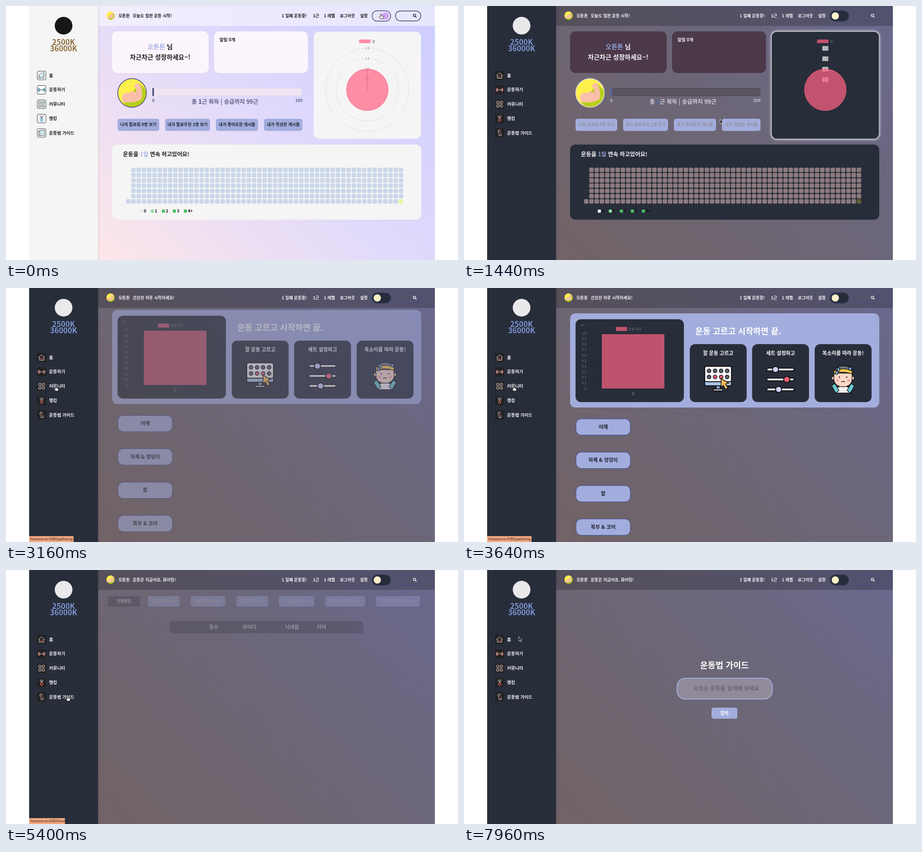
An HTML page that plays this animation: 997 by 561 pixels, repeating every 8000 ms.

```html
<!DOCTYPE html>
<html lang="ko">
<head>
<meta charset="utf-8">
<style>
html, body { margin: 0; width: 100%; height: 100%; overflow: hidden; background: #fff; }
svg { display: block; width: 997px; height: 561px; font: 700 9px "Noto Sans CJK KR", "Noto Sans CJK", "Noto Sans", sans-serif; }
:root {
  --k: 0%;
  --b: 0%;
  --ink: color-mix(in srgb, #1d1d22, #f6f4f8 var(--k));
  --panel: color-mix(in srgb, #f5f5f5, #282d3a var(--k));
  --card: color-mix(in srgb, #fcf5fc, #4c394a var(--k));
  --bg0: color-mix(in srgb, #fde6e8, #716366 var(--k));
  --bg1: color-mix(in srgb, #e1dafb, #6c6676 var(--k));
  --bg2: color-mix(in srgb, #cdcdff, #69698e var(--k));
  --bar: color-mix(in srgb, #ffffff80, #00000036 var(--k));
  --name: color-mix(in srgb, #a9b0e2, #8f9fd6 var(--k));
  --soft: color-mix(in srgb, #5d6288, #d2ced8 var(--k));
  --one: color-mix(in srgb, #3d4672, #5468aa var(--k));
  --ring: color-mix(in srgb, #4f5384, #d9d4dd var(--k));
  --track: color-mix(in srgb, #f0e4f3, #595460 var(--k));
  --trackEdge: color-mix(in srgb, #ddd6ec, #4c4853 var(--k));
  --cell: color-mix(in srgb, #cad7e9, #8d7b7f var(--k));
  --today: color-mix(in srgb, #e9f59e, #62602f var(--k));
  --pill: color-mix(in srgb, #e8e4fb, #272c3a var(--k));
  --pillEdge: color-mix(in srgb, #3b4570, #2f3960 var(--k));
  --searchEdge: color-mix(in srgb, #3b4570, #474e7a var(--k));
  --knob: color-mix(in srgb, #d0a5f3, #fbf0c9 var(--k));
  --mark: color-mix(in srgb, #17171a, #e9e9ec var(--k));
  --brand: color-mix(in srgb, #8c6d3c, #7d95d2 var(--k));
  --tile: color-mix(in srgb, #ffffff, #222222 var(--k));
  --tileEdge: color-mix(in srgb, #33363c, #222222 var(--k));
  --line: color-mix(in srgb, #30343a, #f0e6e2 var(--k));
  --accent: color-mix(in srgb, #2fa3b4, #d9605f var(--k));
  --btnInk: color-mix(in srgb, #20222e, #f4f2f8 var(--b));
  --none: color-mix(in srgb, #eeeeee, #ffffff var(--k));
}
</style>
</head>
<body>
<svg id="stage" viewBox="0 0 997 561" fill="var(--ink)"></svg>
<script>
const LILAC = '#a3addd', NAVY = '#282d3a', PINK = '#ff6384';
const USER = '오튼튼';

const rect = (x, y, w, h, r, fill, more = '') =>
  `<rect x="${x}" y="${y}" width="${w}" height="${h}" rx="${r}" fill="${fill}" ${more}/>`;
const circle = (x, y, r, fill, more = '') => `<circle cx="${x}" cy="${y}" r="${r}" fill="${fill}" ${more}/>`;
const path = (d, fill, more = '') => `<path d="${d}" fill="${fill}" ${more}/>`;
const stroke = (d, color, width = 1) => path(d, 'none', `stroke="${color}" stroke-width="${width}"`);
// y is the visual middle of the line
const text = (x, y, size, str, more = '') =>
  `<text x="${x}" y="${y + size * .36}" font-size="${size}" ${more}>${str}</text>`;
const mid = (x, y, size, str, more = '') => text(x, y, size, str, 'text-anchor="middle" ' + more);
const right = (x, y, size, str, more = '') => text(x, y, size, str, 'text-anchor="end" ' + more);
const group = (x, y, body, more = '') => `<g transform="translate(${x} ${y})" ${more}>${body}</g>`;
const tint = (color, str) => `<tspan fill="${color}">${str}</tspan>`;
const range = (n, fn) => Array.from({ length: n }, (_, i) => fn(i)).join('');
const each = (list, fn) => list.map(fn).join('');
const white = 'fill="#fff"';

const flexedArm = (x, y, scale) => `<g transform="translate(${x} ${y}) scale(${scale})" clip-path="url(#disc)">` +
  circle(0, 0, 32, '#fdf04c') +
  path('M17-20L45 8V45H0L-20 20Z', '#b9d01c') +
  path('M-22 12C-24 2-14-2-6 0C0-6 6-2 9-1C10-8 8-11 5-13C3-20 12-24 17-20C22-8 24 4 20 14C12 21-8 22-20 20Z', '#fbc0aa') +
  stroke('M9-1Q13 3 12 8', '#e9a48f', 1.2) + '</g>';

function home() {
  const radar = each([92, 69, 46, 23], (r, i) => circle(797, 185, r, 'none', 'stroke="#000" stroke-opacity=".13" stroke-width=".7"') +
      rect(790.5, 180.5 - r, 13, 10, 0, '#fff', 'opacity=".75"') +
      mid(797, 185 - r, 7, (2 - i / 2).toFixed(1), 'fill="#666" font-weight="400"')) +
    circle(797, 185, 46, PINK, `fill-opacity=".71" stroke="${PINK}" stroke-opacity=".8"`) +
    stroke('M797 139V185', '#d5506e', .8) +
    rect(779, 74, 25, 8, 0, PINK, 'opacity=".72"') +
    text(807.5, 78, 7, '팔', 'fill="#666" font-weight="400"');
  const buttons = each([[246, 92, '나의 팔로워 0명 보기'], [351, 99, '내가 팔로우한 1명 보기'],
    [463, 93, '내가 좋아요한 게시물'], [569, 85, '내가 작성한 게시물']], ([x, w, label]) =>
    rect(x, 249, w, 27, 5, LILAC) + mid(x + w / 2, 262, 9.1, label, 'fill="var(--btnInk)"'));
  const cell = (col, row, fill) => rect(264.7 + col * 11.57, 357 + row * 11.6, 9.8, 9.8, 2.6, fill);
  const cells = range(7, row => range(53, col => col || row == 6
    ? cell(col, row, col == 52 && row == 6 ? 'var(--today)' : 'var(--cell)') : ''));
  const legend = each(['var(--none)', '#8fdf9f', '#45c161', '#45c161', '#45c161'], (fill, i) =>
    rect(295 + i * 24.3, 449.5, 7, 7, 2, fill) + text(304 + i * 24.3, 453, 9, i == 4 ? '4+' : i, 'fill="#111"'));
  return rect(234, 56, 213, 92, 12, 'var(--card)') +
    mid(340, 90, 14, tint('var(--name)', USER) + ' 님') +
    mid(340, 112.5, 14, '차근차근 성장하세요~!') +
    rect(459, 56, 207, 92, 12, 'var(--card)') + text(471, 75, 9.6, '알림 0개') +
    rect(678, 56, 238, 238, 12, '#fff', 'id="glow" style="filter:drop-shadow(0 0 3px #fff)"') +
    rect(678.7, 56.7, 236.6, 236.6, 11.5, 'var(--panel)') + radar +
    flexedArm(278, 192, 1) + circle(278, 192, 31.6, 'none', 'stroke="var(--ring)" stroke-width="1.7"') +
    rect(323.5, 181.5, 330, 17, 4, 'var(--track)', 'stroke="var(--trackEdge)"') +
    rect(323, 181, 3.2, 18, 1, 'var(--one)') +
    mid(325, 209, 9, 0, 'fill="var(--soft)"') + mid(646, 209, 9, 100, 'fill="var(--soft)"') +
    mid(483, 211, 12.5, `총 ${tint('var(--one)', 1)}근 획득 | 승급까지 99근`, 'fill="var(--soft)"') +
    buttons + rect(234, 306, 682, 166, 12, 'var(--panel)') +
    text(258, 327.5, 12.3, `운동을 ${tint('var(--name)', '1일')} 연속 하고있어요!`) + cells + legend;
}

function exercise() {
  const grey = 'fill="#777b84" font-weight="400"';
  const chart = rect(246, 69, 239, 183, 12, NAVY) +
    range(11, i => stroke(`M275 ${102 + i * 12}H469`, '#20242e', .8) +
      right(270, 100.5 + i * 12.15, 7, i == 10 ? 0 : (1 - i / 10).toFixed(1), grey)) +
    rect(304, 102, 138, 120, 0, '#bf536d') + rect(335, 86, 25, 9, 0, '#bf536d') +
    text(363, 90.5, 7.3, '운동 횟수', grey) + text(258, 82, 4.5, '횟수', grey) + mid(373, 233, 7.3, '팔', grey);
  const steps = each([[498, '할 운동 고르고'], [635.5, '세트 설정하고'], [773.5, '목소리를 따라 운동!']], ([x, label]) =>
    rect(x, 124, 125.5, 128, 12, NAVY) + mid(x + 62.7, 144, 11, label, white));
  const edge = 'stroke="#111" stroke-width="2"';
  const board = rect(531, 173, 59, 43, 4, '#a9c3e8', edge) + rect(531, 173, 59, 34, 4, '#f4f4f6', edge) +
    range(8, i => circle(540.5 + i % 4 * 13.3, i < 4 ? 183 : 196.5, 4, i == 5 || i == 6 ? '#ef6079' : '#5d6472', 'stroke="#111" stroke-width="1.6"')) +
    rect(556, 216, 9, 9, 0, '#8fa9d8', edge) + rect(550, 223, 21, 4, 1, '#f4f4f6', edge) +
    path('M567 200L584 210 577 212 582 221 577 224 572 215 567 219Z', '#fdb95d', 'stroke="#111" stroke-width="1.5"');
  const sliders = each([[180, 687, '#cfd0fb'], [202, 712, '#ef6079'], [224, 694, '#cfd0fb']], ([y, x, fill]) =>
    rect(668, y - 3, 60, 6, 3, '#f4f4f6', edge) + circle(x, y, 6.8, fill, edge));
  const thin = 'stroke="#111" stroke-width="1.3"';
  const athlete = path('M818 232V223Q836 210 854 223V232Z', '#f5f1f0', thin) +
    path('M811 216L818 211 827 226 820 232ZM861 216L854 211 845 226 852 232Z', '#69cbd0', thin) +
    circle(815, 199, 4, '#f8c9b2', thin) + circle(857, 199, 4, '#f8c9b2', thin) +
    path('M816 192Q816 174 836 173Q856 174 856 192V202Q854 218 836 218Q818 218 816 202Z', '#fcd9c6', thin) +
    path('M816 188Q817 173 836 172Q855 173 856 188Z', '#747a80', thin) +
    path('M816 183Q836 174 856 183V190Q836 182 816 190Z', '#fbc84b', thin) +
    circle(828, 197, 1.4, '#111') + circle(844, 197, 1.4, '#111') +
    circle(824, 204, 3, '#f5a7a2') + circle(848, 204, 3, '#f5a7a2') + stroke('M832 208Q836 204 840 208', '#111', 1.4) +
    each([[826, 179], [852, 177], [822, 186]], ([x, y]) => path(`M${x} ${y - 4}q6 8 0 9q-6-1 0-9Z`, '#7fc4f5', thin));
  const parts = each(['어깨', '하체 &amp; 엉덩이', '팔', '복부 &amp; 코어'], (label, i) =>
    rect(247, 289 + i * 73.7, 120, 36, 12, LILAC, 'stroke="#4c5691" stroke-width="1.3"') +
    mid(307, 306.7 + i * 73.7, 11, label, 'fill="#20242f"'));
  return rect(234, 56, 682, 208, 12, LILAC) + chart +
    text(510, 95, 18.3, '운동 고르고 시작하면 끝.', white) + steps + board + sliders + athlete + parts;
}

function community() {
  const shade = '#50465a';
  const posts = [['궁들 모여라', USER, '2024-04-06', 1, 1], ['같이 운동할 사람 구함', '보리', '2023-11-26', 5, 1],
    ['라즉ㅇㄷㅊ', '누리', '2023-11-25', 1, 1], ['ㅇㅇ', '나무콩', '2023-11-24', 1, 1],
    ['같이 ㅇㅇ', '도토리', '2023-11-24', 5, 1], ['운동 같이할사람!!', '보리', '2023-11-24', 2, 1],
    ['안녕하세요', '보리', '2023-11-24', 1, 0], ['예시', '보리', '2023-11-24', 0, 0],
    ['아 오늘 밤샌다 같이 샐사람...', '보리', '2023-11-23', 42, 5],
    ['빨리 회식하고싶다', '보리', '2023-11-23', 88, 2], ['같이 운동할 사람 구해요', '보리', '2023-11-23', 59, 2]];
  const head = each([[264, '번호'], [390, '제목'], [509, '글쓴이'], [571, '날짜'], [627, '조회수'], [665, '좋아요']],
    ([x, label]) => mid(x, 63, 9.4, label));
  const rows = each(posts, ([title, author, date, views, likes], i) => {
    const y = 95.5 + i * 22.6;
    return mid(264, y, 9.3, i + 1) + text(300, y, 9.3, title) + mid(513.5, y, 9.3, author) +
      mid(574.5, y, 9.8, date) + right(642, y, 9.5, views) + mid(676, y, 9.5, likes);
  });
  const top = each([[88, '빨리 회식하고싶다'], [59, '같이 운동할 사람 구'], [42, '아 오늘 밤샌다 같이']], ([views, title], i) =>
    group(0, i * 48.8, rect(730, 222, 48, 42, 5, '#535370') + mid(754, 243, 12.3, views + '회') + text(791, 231, 11.2, title) +
      text(791, 244.5, 7, '글쓴이 : 보리') + text(791, 256.5, 7.5, '날짜 : 2023-11-23')));
  const pager = each([[401, '이전'], [505, '다음']], ([x, label]) =>
    rect(x, 432, 24, 13.5, 1, '#867d83') + mid(x + 12, 438.5, 8.4, label, 'fill="#625b62"'));
  return group(0, 5.6, rect(236, 50, 457, 27, 5, '#413e4c') + head + rows + pager + mid(465, 438, 9.3, '현재 페이지: 1') +
    rect(706, 50, 207, 390, 12, LILAC) + rect(718, 62, 183, 113, 6, shade) + mid(809.5, 94, 18.2, '커뮤니티') +
    mid(809.5, 134, 9.1, '장소를 공유하고') + mid(809.5, 149, 9.3, '운동메이트를 찾아봐요!') +
    rect(718, 181, 183, 195, 6, '#6873a0') + text(730, 198, 13.2, '인기게시물 TOP3') + top +
    rect(718, 383, 183, 43, 6, shade) + mid(809, 404, 12.3, '글 작성하러 가기'), 'font-weight="500"');
}

function ranking() {
  const tabs = each([[224, 72, '전체랭킹'], [313, 70, '팔근육 best'], [407, 77, '어깨근육 best'], [508, 70, '등근육 best'],
    [602, 78, '가슴근육 best'], [704, 88, '복부 &amp; 코어 best'], [816, 97, '하체 &amp; 엉덩이 best']], ([x, w, label], i) =>
    rect(x, 58, w, 23, 5, i ? LILAC : '#3c3848') + mid(x + w / 2, 69.5, 8.6, label, `fill="${i ? '#d4cfda' : '#fff'}"`));
  const head = each([[458, '등수'], [537, '아이디'], [631, '닉네임'], [696, '티어']], ([x, label]) => mid(x, 126, 11, label, white));
  return group(0, 11, tabs + rect(362, 113, 426, 27, 5, '#3c3848') + head);
}

const guide = () => mid(574.5, 210.5, 18.5, '운동법 가이드', white) +
  rect(470, 239, 210, 46, 18, '#918b99', `stroke="${LILAC}" stroke-width="2"`) +
  mid(578.5, 261.5, 12.2, '모르는 운동을 검색해 보세요', 'fill="#696470"') +
  rect(546, 304, 57, 24.5, 5, LILAC) + mid(574.5, 316, 9.8, '입력', white);

function header() {
  const items = each([[608, '1 일째 운동중!'], [677, '1근'], [701, '1 레벨'], [736.5, '로그아웃'], [781, '설정']],
    ([x, label]) => text(x, 21.5, 9.1, label));
  return rect(203, 0, 743, 44, 0, 'var(--bar)') + flexedArm(230.5, 21, .29) + text(248, 21.5, 9.1, USER) +
    text(279.5, 21.5, 9.1, '', 'id="greeting"') + items +
    rect(807.5, 10.5, 41, 23, 11.5, 'var(--pill)', 'stroke="var(--pillEdge)" stroke-width="1.4"') +
    circle(0, 22, 8, 'var(--knob)', 'id="knob"') +
    rect(859, 11, 56, 22, 11, 'none', 'stroke="var(--searchEdge)" stroke-width="1.4"') +
    circle(901, 20.7, 2.6, 'none', 'stroke="var(--ink)" stroke-width="1.4"') + stroke('M903 22.7L905.5 25.5', 'var(--ink)', 1.6);
}

function sidebar() {
  const line = 'var(--line)', accent = 'var(--accent)';
  const icons = [
    stroke('M-7 0L0-6 7 0M-5-1V6H5V-1', line) + stroke('M-2 6V1H2V6', accent) + `<g id="chimney">${stroke('M4-4V-7H6V-2M-7 6V2', accent)}</g>`,
    stroke('M-4-4V4M4-4V4M-7-2Q-9 0-7 2M7-2Q9 0 7 2', accent, 1.4) + stroke('M-4 0H4M-6-4V4M6-4V4', line),
    each([[-4, -4], [4, -4], [-4, 4], [4, 4]], ([x, y], i) => circle(x, y, 3, 'none', `stroke="${line}"`) + circle(x, y, 1, accent)) + stroke('M-1 0H1', line),
    stroke('M-3-7V-3L0 0 3-3V-7M0-6V0', line) + circle(0, 3.5, 2.6, 'none', `stroke="${accent}" stroke-width="1.4"`),
    `<g id="book">${stroke('M-7-4H-4V-6H7V6H-7ZM-4-4V6', line)}${stroke('M-2-3H5M-2 0H1M3 0H5M-2 3H5', accent)}</g>`
  ];
  const menu = each(['홈', '운동하기', '커뮤니티', '랭킹', '운동법 가이드'], (label, i) =>
    group(78.5, 153.5 + i * 31.7, rect(-9.5, -9.5, 19, 19, 3, 'var(--tile)', 'stroke="var(--tileEdge)"') + icons[i]) +
    text(95, 153.3 + i * 31.7, 9.6, label));
  return rect(203, 0, 3, 561, 0, '#000', 'opacity=".06"') + rect(51, 0, 152, 561, 0, 'var(--panel)') +
    circle(127, 43.5, 19.5, 'var(--mark)') +
    each(['2500K', '36000K'], (label, i) => mid(127, 80 + i * 14.5, 16.5, label, 'fill="var(--brand)"')) + menu;
}

const pages = [
  { id: 'home', draw: home, from: -1000, to: 2552 },
  { id: 'exercise', draw: exercise, from: 2952, to: 3700 },
  { id: 'community', draw: community, from: 4100, to: 4880 },
  { id: 'ranking', draw: ranking, from: 5280, to: 5880 },
  { id: 'guide', draw: guide, from: 6280, to: 9000 }
];
// [from, to, address, width]
const hints = [[2280, 2760, 'training', 88], [3080, 4300, 'gathering', 98], [4480, 5000, 'ladder', 83], [5080, 7360, 'howto', 79]];
const greetings = [[4900, '운동은 지금이죠. 화이팅!'], [2552, '건강한 하루 시작하세요!'], [0, '오늘도 힘찬 운동 시작!']];
const links = [[0, 640], [2240, 2580], [2900, 4180], [4300, 4860], [5120, 7320]];
// [time, x, y]
const trail = [[0, 828, 22], [620, 828, 22], [1440, 565, 250], [2240, 113, 187], [2540, 113, 187], [2640, 112, 207], [2900, 111, 221],
  [4080, 111, 221], [4360, 106, 248], [4760, 106, 248], [5240, 137, 283], [7240, 137, 283], [7800, 121, 147], [8000, 121, 147]];

const stage = document.getElementById('stage');
stage.innerHTML = `<defs><clipPath id="disc"><circle r="32"/></clipPath>
  <linearGradient id="sky" gradientUnits="userSpaceOnUse" x1="203" y1="561" x2="855" y2="-91">
  ${range(3, i => `<stop offset="${i / 2}" style="stop-color:var(--bg${i})"/>`)}</linearGradient></defs>` +
  rect(51, 0, 895, 561, 0, 'url(#sky)') +
  each(pages, p => `<g id="${p.id}">${p.draw()}</g>`) + header() + sidebar() +
  `<g id="hint">${rect(51, 548, 88, 13, 1, '#f3a67c', 'id="hintBox"')}
  ${text(54, 554.7, 7.2, '', 'id="hintText" fill="#222" font-weight="400" font-family="Inter, sans-serif"')}</g>` +
  `<g id="cursor">${path('M0 0V10L2.4 8 4 11.5 5.5 10.8 4 7.5H7Z', '#111', 'id="arrow" stroke="#fff" stroke-width=".8"')}
  ${path('M-2 1V-3.5a1 1 0 0 1 2 0V-.5L3.5 .5Q5 1 4.6 3L4 6.5H-1.5L-4.5 2.5Q-4 1-2 2Z', '#fff', 'id="hand" stroke="#111" stroke-width=".9"')}</g>`;

const $ = id => document.getElementById(id);
const ramp = (t, a, b) => Math.min(1, Math.max(0, (t - a) / (b - a)));
const smooth = p => p * p * (3 - 2 * p);

function cursorAt(t) {
  const i = trail.findIndex(point => point[0] > t);
  const [t0, x0, y0] = trail[i - 1], [t1, x1, y1] = trail[i];
  const p = smooth(ramp(t, t0, t1));
  return [x0 + (x1 - x0) * p, y0 + (y1 - y0) * p];
}

function render(t) {
  const dark = ramp(t, 560, 900);
  const root = document.documentElement.style;
  root.setProperty('--k', dark * 100 + '%');
  root.setProperty('--b', ramp(t, 1040, 1800) * 100 + '%');
  $('knob').setAttribute('cx', 837 - 18 * smooth(dark));
  $('glow').style.opacity = ramp(t, 900, 1100) * (1 - ramp(t, 1440, 1800));

  for (const { id, from, to } of pages) {
    const enter = ramp(t, from, from + 400), leave = ramp(t, to, to + 400);
    $(id).setAttribute('opacity', enter * (1 - leave));
    $(id).setAttribute('transform', `translate(0 ${16 * (enter + leave - 1)})`);
  }
  $('greeting').textContent = greetings.find(([from]) => t >= from)[1];

  const hint = hints.find(([from, to]) => t >= from && t < to + 150);
  $('hint').setAttribute('opacity', hint ? 1 - ramp(t, hint[1], hint[1] + 150) : 0);
  if (hint) {
    $('hintText').textContent = 'homeserve:4260/' + hint[2];
    $('hintBox').setAttribute('width', hint[3]);
  }

  const phase = t / 2200 * Math.PI * 2;
  const open = Math.max(0, Math.cos(phase - .5));
  $('book').setAttribute('transform', `rotate(${-18 * (1 - open)}) scale(${.45 + .55 * open} 1)`);
  $('chimney').setAttribute('opacity', open > .1 ? 1 : 0);

  $('cursor').setAttribute('transform', `translate(${cursorAt(t)})`);
  const onLink = links.some(([from, to]) => t >= from && t < to);
  $('hand').setAttribute('opacity', onLink ? 1 : 0);
  $('arrow').setAttribute('opacity', onLink ? 0 : 1);
}

function tick() {
  render(performance.now() % 8000);
  requestAnimationFrame(tick);
}
tick();
</script>
</body>
</html>
```
